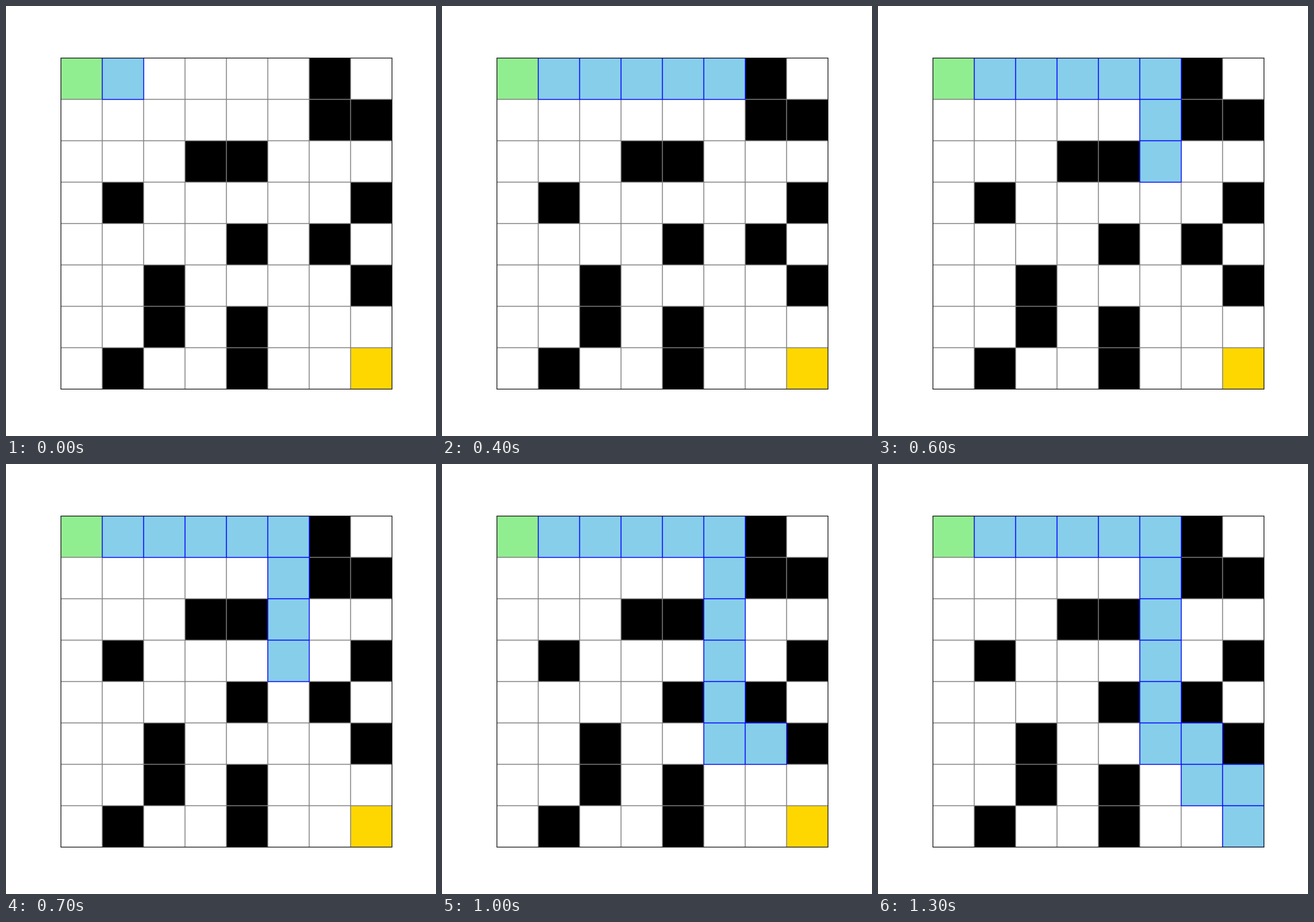
Animation of 748x748 px, one loop 1.4 s. Source, as a matplotlib script:

```python
import matplotlib.pyplot as plt
from matplotlib.animation import FuncAnimation
from matplotlib.patches import Rectangle

GRID = [
    "S.....#.",
    "......##",
    "...##...",
    ".#.....#",
    "....#.#.",
    "..#....#",
    "..#.#...",
    ".#..#..G",
]
COLORS = {"S": "lightgreen", "G": "gold", "#": "black", ".": "white"}
MOVES = "RRRRRDDDDDRDRD"
SIZE = len(GRID)

fig, ax = plt.subplots(figsize=(7.48, 7.48), dpi=100)
ax.set(xlim=(0, SIZE), ylim=(SIZE, 0), aspect="equal", xticks=[], yticks=[])


def add_cell(row, col, face, edge):
    return ax.add_patch(Rectangle((col, row), 1, 1, facecolor=face, edgecolor=edge))


def walk(moves):
    row = col = 0
    for move in moves:
        row += move == "D"
        col += move == "R"
        yield row, col


for r, line in enumerate(GRID):
    for c, kind in enumerate(line):
        add_cell(r, c, COLORS[kind], "gray")

trail = [add_cell(r, c, "skyblue", "blue") for r, c in walk(MOVES)]


def update(frame):
    for i, cell in enumerate(trail):
        cell.set_visible(i <= frame)
    return trail


anim = FuncAnimation(fig, update, frames=len(MOVES), interval=100,
                     repeat=True, repeat_delay=0)
plt.show()
```
